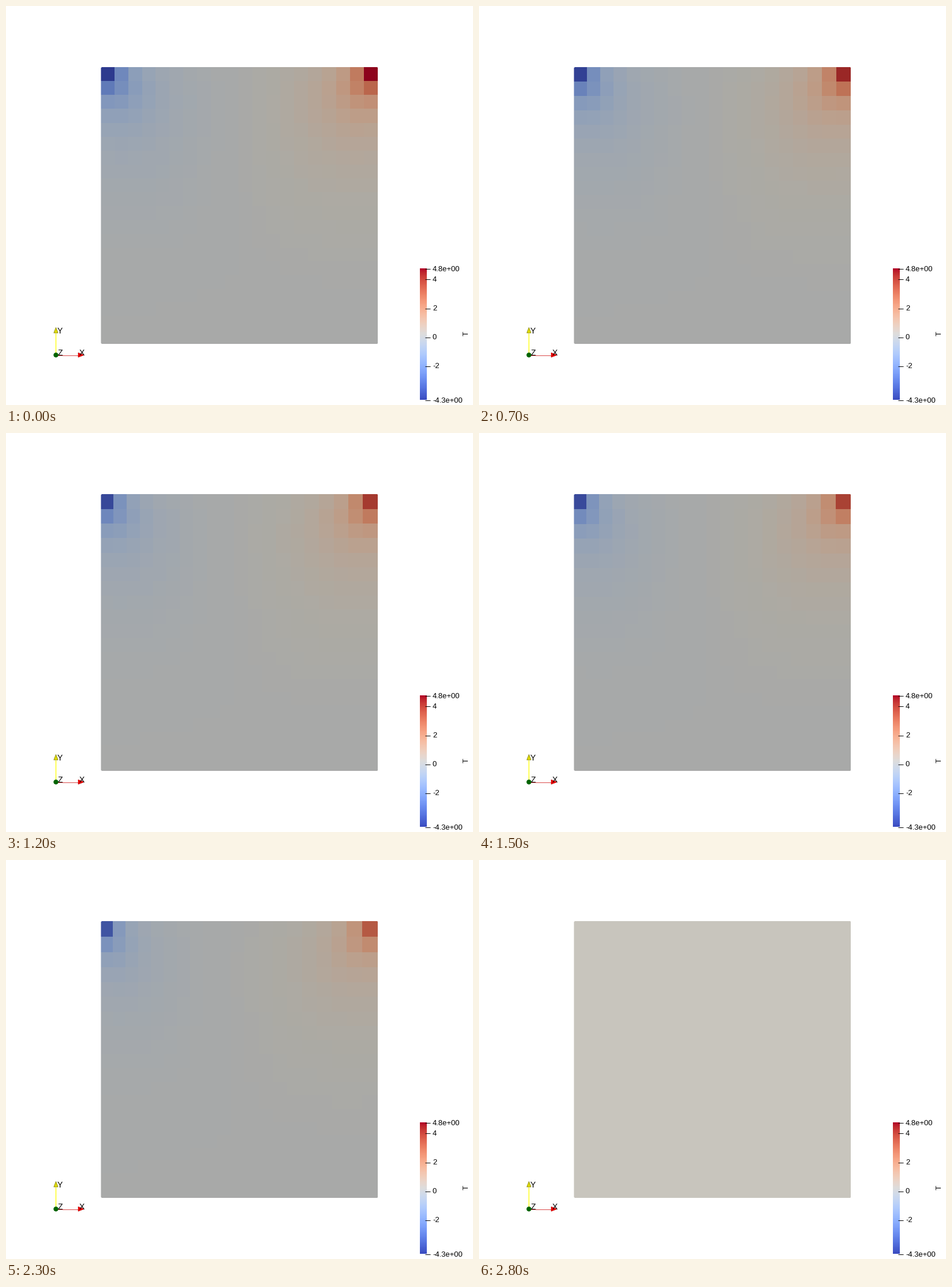
Animation of 809 by 692 pixels, one loop 3000 ms. Source, as a matplotlib script:

```python
import numpy as np
import matplotlib.pyplot as plt
from matplotlib.animation import FuncAnimation
from matplotlib.patches import Circle, Polygon

W, H, DPI = 809, 692, 64
FRAMES, SOLVED = 30, 28          # the last two frames show the bare block
N = 20                           # cells per side
LEFT, TOP, SIDE = 164.5, 106, 480
LO, HI = -4.31, 4.73             # pressure range of the legend
LIGHT = np.array([200, 197, 189]) / 255
CMAP = plt.get_cmap("coolwarm")

fig = plt.figure(figsize=(W / DPI, H / DPI), dpi=DPI, facecolor="white")
ax = fig.add_axes([0, 0, 1, 1])


def px(size):
    """Pixels to points."""
    return size * 72 / DPI


def label(x, y, s, size=13, **kw):
    ax.text(x, y, s, fontsize=px(size), family="Liberation Sans",
            color="black", va="center_baseline", zorder=5, **kw)


def line(x, y, color, width=1.0):
    ax.plot(x, y, color=color, lw=px(width), solid_capstyle="butt", zorder=3)


def graded_edges(ratio):
    """Cell edges on 0..1, the last cell being `ratio` times the first."""
    widths = ratio ** (np.arange(N) / (N - 1))
    return np.concatenate([[0], np.cumsum(widths) / widths.sum()])


def corner_field(dx, dy):
    """Viscous flow pressure near a corner under a sliding lid."""
    r = np.hypot(dx, dy)
    angular = (1.07 * dy + 0.681 * dx) / r
    return angular * np.maximum(1 / r - 1 / 18, 0)


def pressure(k):
    """Cell values, row 0 at the lid."""
    c = np.arange(N) + 0.5
    x, y = np.meshgrid(c, c)
    fade = k / (SOLVED - 1)
    p = (4.1 * (1 - 0.44 * fade) * corner_field(N - x, y)
         - 3.5 * (1 - 0.42 * fade) * corner_field(x, y))
    p[0, 0] = LO + 0.03 * k
    p[0, -1] = HI - 0.065 * k
    return p


def block_image(k):
    if k >= SOLVED:
        return np.ones((SIDE, SIDE, 3)) * LIGHT
    edges = graded_edges(1.015 + 0.011 * k)
    t = (np.arange(SIDE) + 0.5) / SIDE
    col = np.clip(np.searchsorted(edges, t) - 1, 0, N - 1)
    row = N - 1 - col[::-1]
    rgb = CMAP((pressure(k) - LO) / (HI - LO))[..., :3] * LIGHT
    return rgb[np.ix_(row, col)]


def draw_legend():
    x0, x1, y0, y1 = 717, 729, 455.5, 683
    ramp = CMAP(np.linspace(1, 0, 256))[:, None, :3]
    ax.imshow(ramp, extent=(x0, x1, y1, y0), aspect="auto",
              interpolation="nearest", zorder=2)
    ticks = [(HI, "4.8e+00"), (4, "4"), (2, "2"), (0, "0"),
             (-2, "-2"), (LO, "-4.3e+00")]
    for value, text in ticks:
        y = y1 - (value - LO) / (HI - LO) * (y1 - y0)
        y = np.floor(y) + 0.5
        line([726, 735], [y, y], "black")
        label(739, y - 0.5, text)
    label(798, 568.5, "T", rotation=90, ha="center")


def draw_triad():
    line([86.5, 86.5], [605, 567], "#ffff00", 1.3)
    line([88, 126], [605.5, 605.5], "#d94848", 1.0)
    ax.add_patch(Polygon([(86.5, 557.5), (82.8, 567), (90.2, 567)], fc="#e0dc00",
                         ec="#77750a", lw=px(0.7), zorder=4))
    ax.add_patch(Polygon([(135.5, 605.3), (125, 601.3), (125, 609.3)], fc="#f40000",
                         ec="#a00000", lw=px(0.5), zorder=4))
    ax.add_patch(Circle((86.5, 605.3), 4.2, fc="#006400", ec="none", zorder=4))
    for x, y, s in [(93, 562.5, "Y"), (131, 601, "X"), (93.5, 600.5, "Z")]:
        label(x, y, s, 14, ha="center")


right, bottom = LEFT + SIDE, TOP + SIDE
block = ax.imshow(block_image(0), extent=(LEFT, right, bottom, TOP),
                  interpolation="nearest", aspect="auto", zorder=1)
cut = 1.5
outline = Polygon([(LEFT + cut, TOP), (right - cut, TOP), (right, TOP + cut),
                   (right, bottom - cut), (right - cut, bottom),
                   (LEFT + cut, bottom), (LEFT, bottom - cut), (LEFT, TOP + cut)],
                  transform=ax.transData)
block.set_clip_path(outline)

draw_legend()
draw_triad()
ax.set_xlim(0, W)
ax.set_ylim(H, 0)
ax.axis("off")


def update(k):
    block.set_data(block_image(k))
    return [block]


anim = FuncAnimation(fig, update, frames=FRAMES, interval=100,
                     repeat=True, repeat_delay=0, blit=False)
plt.show()
```
